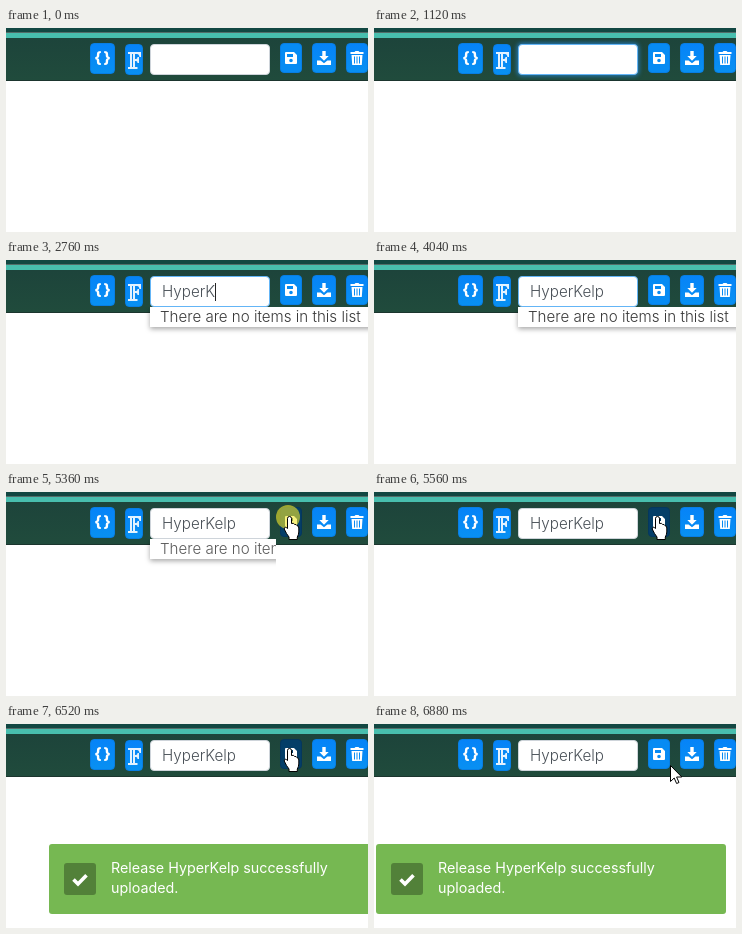
These frames come from a looping animation (362x204 px, 7160 ms). An HTML page:

```html
<!DOCTYPE html>
<html lang="en">
<head>
<meta charset="utf-8">
<title>Release upload</title>
<style>
html, body { margin: 0; width: 100%; height: 100%; overflow: hidden; background: #fff; }
#stage { position: relative; width: 362px; height: 204px; overflow: hidden; background: #fff; font-family: Inter, sans-serif; }
#stage div, #stage svg { position: absolute; box-sizing: border-box; }
.bar { left: 0; top: 0; width: 362px; height: 53px; background: linear-gradient(#124742 4px, #536d69 4px 5px, #48beae 5px 10px, #1d443b 10px, #204b3c 52px, #1b352e 52px); }
.btn { top: 15px; height: 31px; border-radius: 4px; background: linear-gradient(#0683f8, #0890f2); border: 1px solid #087ee3; color: #fff; text-align: center; }
.btn svg { fill: #fff; width: 14px; height: 14px; left: 50%; top: 50%; margin: -7px; }
.braces { font: 800 15px/28px Inter, sans-serif; letter-spacing: 2px; padding-left: 2px; }
.btn .letter { width: 13px; height: 17px; margin: -8px -6px; fill: #e3f2ff; }
#field { left: 144px; top: 16px; width: 120px; height: 31px; border: 1px solid #ced4da; border-radius: 4px; background: #fff; }
#entry { left: 156px; top: 22px; height: 20px; font-size: 15.2px; line-height: 20px; font-weight: 300; color: #495057; white-space: pre; }
#caret { left: 100%; top: 1px; width: 1px; height: 18px; background: #222; }
#list { left: 144px; top: 47px; width: 240px; height: 20px; padding-left: 10px; background: #fff; box-shadow: 0 2px 5px rgba(0,0,0,.35); font-size: 15.1px; line-height: 20px; font-weight: 300; white-space: nowrap; }
#toast { left: 0; top: 120px; width: 350px; height: 70px; border-radius: 3px; background: #76b852; color: #fff; font-size: 14.3px; line-height: 20px; font-weight: 400; white-space: nowrap; }
.tick { left: 15px; top: 19px; width: 32px; height: 32px; border-radius: 3px; background: #528139; }
.msg { left: 62px; top: 14px; }
#over { left: 0; top: 0; }
</style>
</head>
<body>
<div id="stage">
  <div class="bar"></div>
  <div class="btn braces" style="left:84px;width:25px">{}</div>
  <div class="btn" style="left:119px;width:18px;top:16px">
    <svg class="letter" viewBox="0 0 13 17"><path d="M0 0H13V5H11.5Q11 2 9 2H7V7H8Q9.5 7 9.5 5H11V11H9.5Q9.5 9 8 9H7V15H9.5V17H0V15H2V2H0Z"/><path d="M4.5 2V15" stroke="#0789f5"/></svg>
  </div>
  <div class="btn" id="save" style="left:274px;width:22px;height:30px">
    <svg viewBox="0 0 14 14"><path fill-rule="evenodd" d="M2 1H10L13 4V12Q13 13 12 13H2Q1 13 1 12V2Q1 1 2 1ZM3 3V6H9V3ZM7 7.7A1.8 1.8 0 1 0 7 11.3A1.8 1.8 0 1 0 7 7.7Z"/></svg>
  </div>
  <div class="btn" style="left:306px;width:24px;height:30px">
    <svg viewBox="0 0 14 14"><path d="M5.3 0H8.7V5H11.7L7 9.7 2.3 5H5.3ZM0 9.5H3.6L7 12.2 10.4 9.5H14V14H0Z"/></svg>
  </div>
  <div class="btn" style="left:340px;width:22px;height:30px">
    <svg viewBox="0 0 14 14"><path d="M.5 1H4.5L5.5 0H8.5L9.5 1H13.5V3H.5ZM1.5 4H12.5L11.8 14H2.2Z"/><path d="M4.5 5.5V12.5M7 5.5V12.5M9.5 5.5V12.5" stroke="#078bf3"/></svg>
  </div>
  <div id="field"></div>
  <div id="list">There are no items in this list</div>
  <div id="entry"><span id="typed"></span><div id="caret"></div></div>
  <div id="toast">
    <div class="tick"><svg width="32" height="32" fill="none" stroke="#fff" stroke-width="3.6"><path d="M9.5 16.5L14 21 22.5 12.2"/></svg></div>
    <div class="msg">Release HyperKelp successfully<br>uploaded.</div>
  </div>
  <svg id="over" width="362" height="204">
    <circle id="click" r="12" fill="#f4e72a" fill-opacity=".6"/>
    <g fill="#fff" stroke="#000" stroke-linejoin="round">
      <path id="arrow" d="M.5 .5V16.5L4.2 13 6.6 18.5 9 17.5 6.6 12H11.8Z"/>
      <path id="hand" d="M-1.5 1.5Q-1.5 -.5 .5 -.5T2.5 1.5V6.5Q5 5.7 5.6 7.5 7.4 7 8 8.7 9.8 8.7 9.8 11V15Q9.6 18 8.3 20V22.5H0V20Q-2.5 17 -4.8 12 -4.4 8.7 -1.5 11.5Z"/>
    </g>
  </svg>
</div>
<script>
const LOOP = 7160, NAME = 'HyperKelp';
const keyTimes = [1480, 1680, 2040, 2200, 2320, 2760, 3000, 3200, 3480];
const caretOn = [[590, 1120], [1480, 4040], [4520, 5000]];
const clicks = [[540, 660, 185, 32], [5360, 5540, 282, 25]];
// time, x, y of the pointer tip
const trips = [
  [[40, 269, 173], [300, 222, 82], [480, 185, 33], [600, 185, 32], [720, 178, 5], [760, 178, 5]],
  [[5000, 286, 2], [5120, 283, 25], [6640, 283, 25], [6860, 296, 41], [LOOP, 296, 41]]
];
const el = {};
document.querySelectorAll('[id]').forEach(e => el[e.id] = e);

const ramp = (t, a, b) => Math.min(1, Math.max(0, (t - a) / (b - a)));
const within = (t, [a, b]) => t >= a && t < b;
const show = (e, on) => { e.style.visibility = on ? 'visible' : 'hidden'; };
const mix = (a, b, k) => `rgb(${a.map((v, i) => Math.round(v + (b[i] - v) * k))})`;

function pointerAt(t) {
  for (const trip of trips) {
    for (let i = 1; i < trip.length; i++) {
      const [t0, x0, y0] = trip[i - 1], [t1, x1, y1] = trip[i];
      if (!within(t, [t0, t1])) continue;
      const u = ramp(t, t0, t1), k = u * u * (3 - 2 * u);
      return [x0 + (x1 - x0) * k, y0 + (y1 - y0) * k];
    }
  }
  return null;
}

function drawPointer(t) {
  const p = pointerAt(t), onSave = t >= 5080 && t < 6740;
  show(el.arrow, p && !onSave);
  show(el.hand, p && onSave);
  if (p) {
    const move = `translate(${Math.round(p[0])} ${Math.round(p[1])})`;
    el.arrow.setAttribute('transform', move);
    el.hand.setAttribute('transform', move);
  }
  const c = clicks.find(c => within(t, c));
  show(el.click, c);
  if (c) {
    el.click.setAttribute('cx', c[2]);
    el.click.setAttribute('cy', c[3]);
  }
}

function draw(t) {
  el.typed.textContent = NAME.slice(0, keyTimes.filter(k => t >= k).length);
  show(el.caret, caretOn.some(r => within(t, r)));

  const focus = t < 5360 ? ramp(t, 560, 720) : 0;
  const glow = t < 1480 ? 0.65 * focus : 0;
  el.field.style.borderColor = mix([206, 212, 218], [100, 181, 246], focus);
  el.field.style.boxShadow = `0 0 4px 1px rgba(40,150,255,${glow})`;

  show(el.list, within(t, [1480, 5400]));
  const cut = t < 1680 || t >= 5360;
  el.list.style.clipPath = cut ? 'inset(0 114px -8px -6px)' : 'inset(0 0 -8px -6px)';
  const ink = t < 5360 ? 0.4 + 0.5 * ramp(t, 1480, 2040) : 0.75;
  el.list.style.color = `rgba(34,34,34,${ink})`;

  const hover = ramp(t, 5080, 5200) - ramp(t, 6720, 6870);
  el.save.style.background = mix([7, 139, 243], [4, 62, 104], hover);
  el.save.style.borderColor = mix([8, 126, 227], [4, 55, 94], hover);

  const left = 2 + 360 * Math.pow(1 - ramp(t, 6224, 6800), 3);
  show(el.toast, t >= 6240);
  el.toast.style.transform = `translateX(${Math.round(left)}px)`;

  drawPointer(t);
}

const start = performance.now();
function tick() {
  draw((performance.now() - start) % LOOP);
  requestAnimationFrame(tick);
}
tick();
</script>
</body>
</html>
```
